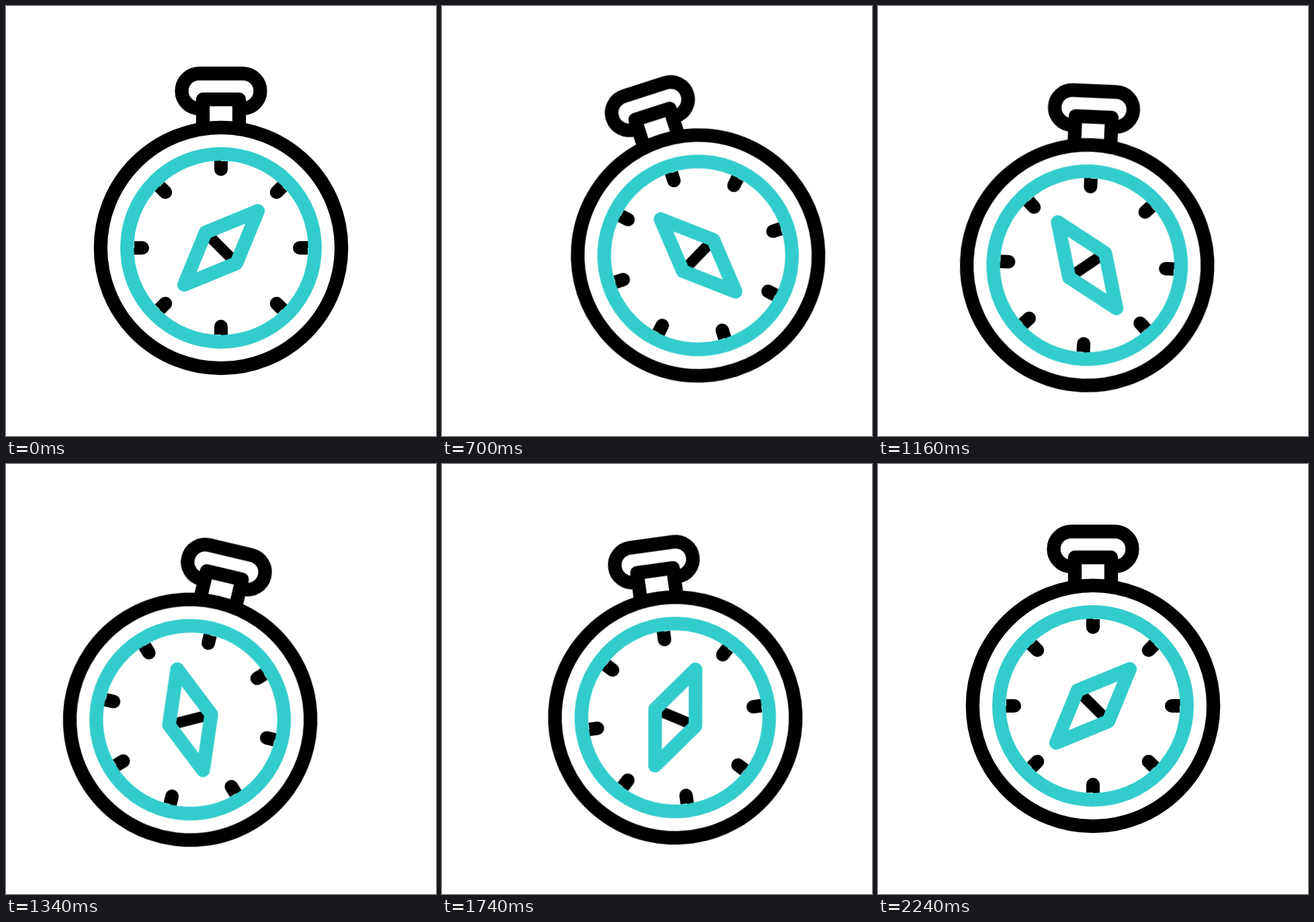
An HTML page without scripts for the animation above (2.4 s loop, 640 px wide and 640 px high).

```html
<!DOCTYPE html>
<html lang="en">
<head>
<meta charset="utf-8">
<title>Swinging compass</title>
<style>
  html, body { margin: 0; width: 100%; height: 100%; overflow: hidden; background: #fff; }
  svg { display: block; width: 100%; height: 100%; }

  .line { fill: none; stroke: #000; stroke-width: 20.3; stroke-linejoin: round; }
  .teal { stroke: #33cccc; }

  .drop, .swing, .needle {
    animation: 2400ms cubic-bezier(.333, 0, .667, 1) infinite;
  }
  .drop { animation-name: drop; }
  .swing { animation-name: swing; transform-origin: 320px 161px; }
  .needle { animation-name: turn; transform-origin: 320px 360px; }

  @keyframes drop {
    0%, 8.333% { transform: translateY(0); }
    37.5%, 62.5% { transform: translateY(26px); }
    92.5%, 100% { transform: translateY(0); }
  }
  @keyframes swing {
    0%, 8.333% { transform: rotate(0deg); }
    33.333% { transform: rotate(-19.3deg); }
    58.333% { transform: rotate(14.25deg); }
    75% { transform: rotate(-9.25deg); }
    91.667%, 100% { transform: rotate(0deg); }
  }
  @keyframes turn {
    0%, 8.333% { transform: rotate(0deg); }
    35.833% { transform: rotate(-85.5deg); animation-timing-function: cubic-bezier(.7, 0, .3, 1); }
    93.333%, 100% { transform: rotate(0deg); }
  }
</style>
</head>
<body>
<svg viewBox="0 0 640 640">
  <defs>
    <path id="tick" d="M320 220V231H330V243a10 10 0 0 1-20 0V220Z"/>
    <g id="pair">
      <use href="#tick"/>
      <use href="#tick" transform="rotate(180 320 360)"/>
    </g>
  </defs>
  <g class="drop">
    <g class="swing">
      <path class="line" d="M290 152.5H287.5a26 26 0 0 1 0-52H352.5a26 26 0 0 1 0 52H350"/>
      <path class="line" d="M293 180V139H347V180"/>
      <circle class="line" cx="320" cy="360" r="179.2"/>
      <use href="#pair"/>
      <use href="#pair" transform="rotate(45 320 360)"/>
      <use href="#pair" transform="rotate(90 320 360)"/>
      <use href="#pair" transform="rotate(135 320 360)"/>
      <circle class="line teal" cx="320" cy="360" r="139.8"/>
      <g class="needle">
        <path d="M297 337L343 383" stroke="#000" stroke-width="16"/>
        <path class="line teal" d="M375 305L343 383L265 415L297 337Z"/>
      </g>
    </g>
  </g>
</svg>
</body>
</html>
```
